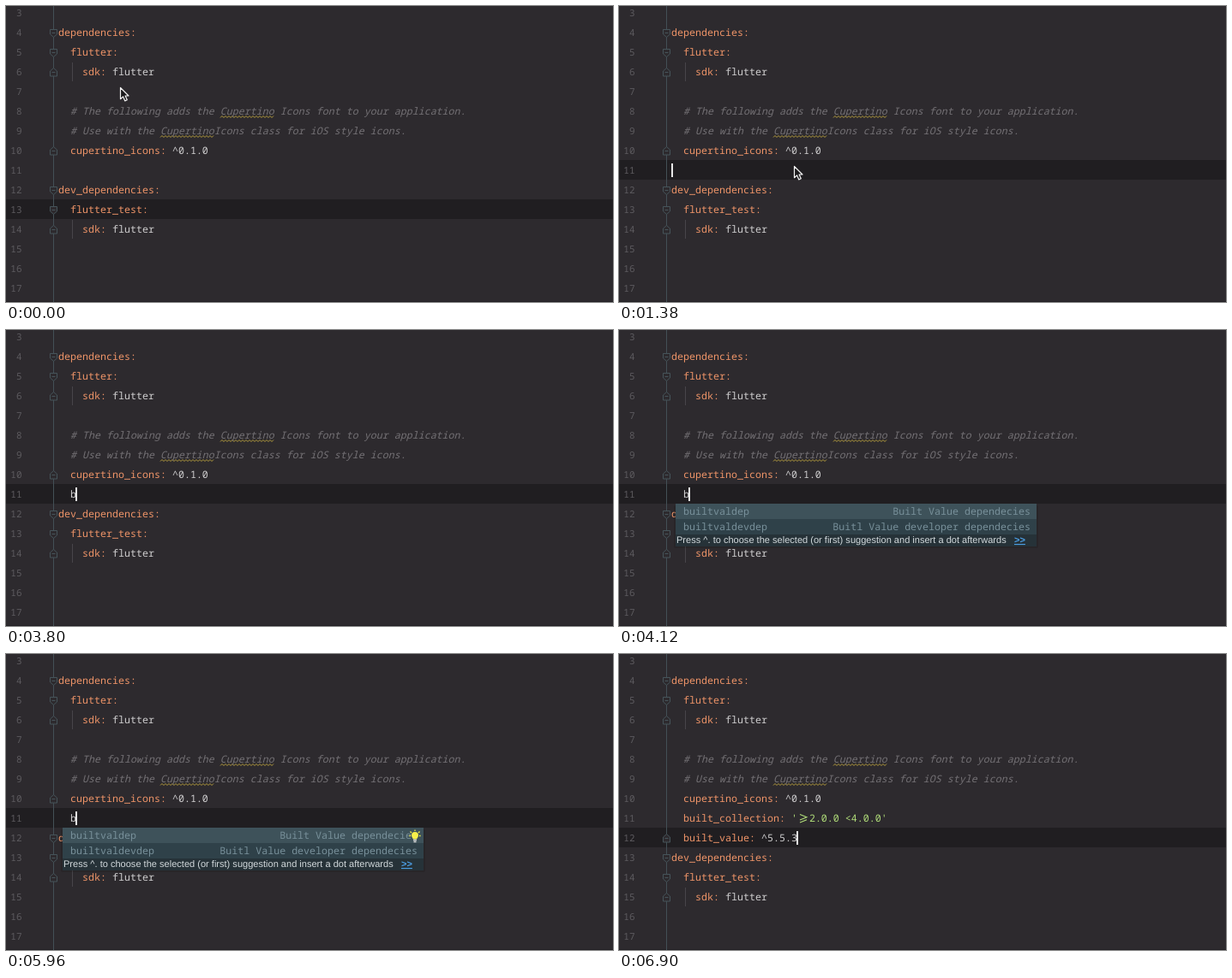
Recreate the animation shown at these times as an HTML page. Size 708 by 346 pixels, loop 6.94 s.

```html
<!DOCTYPE html>
<html lang="en">
<head>
<meta charset="utf-8">
<title>Live template in an editor</title>
<style>
  html, body { margin: 0; width: 100%; height: 100%; overflow: hidden; background: #2d2a2e; }
  svg { display: block; width: 708px; height: 346px; }
  text { font: 11.667px "Noto Sans Mono", "DejaVu Sans Mono", monospace; white-space: pre; text-rendering: geometricPrecision; }
  .num { fill: #5d5b5f; font-size: 11px; text-anchor: end; }
  .key { fill: #ee9468; }
  .val { fill: #cfcecf; }
  .str { fill: #b0dd79; }
  .note { fill: #737074; font-style: italic; }
  .fold { fill: #2d2a2e; stroke: #46545a; }
  .guide { stroke: #48454a; }
  .wave { fill: none; stroke: #b59d3d; }
  .item { fill: #78909a; }
  .right { text-anchor: end; }
  .hint { font: 11.05px "Liberation Sans", Arial, sans-serif; fill: #d3dadd; }
  .link { font-weight: bold; fill: #4c9fe6; text-decoration: underline; }
</style>
</head>
<body>
<svg viewBox="0 0 708 346" xmlns="http://www.w3.org/2000/svg">
  <rect width="708" height="346" fill="#2d2a2e"/>
  <rect id="current" width="708" height="23" fill="#201e21"/>
  <path d="M0 345.5H708" stroke="#232125"/>
  <path d="M55.5 0V346" stroke="#435056"/>
  <g id="code"></g>
  <rect id="caret" width="2" height="16" fill="#e8e8e8"/>
  <g id="popup">
    <rect x="64" y="205" width="425" height="50" rx="2" fill="#000" opacity=".12"/>
    <rect x="66" y="203" width="421" height="50" fill="#263238"/>
    <rect x="66" y="203" width="421" height="18" fill="#3e525a"/>
    <rect x="66" y="221" width="421" height="18" fill="#2f4149"/>
    <text class="item" x="75" y="216">builtvaldep</text>
    <text class="item right" x="480" y="216">Built Value dependecies</text>
    <text class="item" x="75" y="234">builtvaldevdep</text>
    <text class="item right" x="480" y="234">Buitl Value developer dependecies</text>
    <text class="hint" x="67" y="249">Press ^. to choose the selected (or first) suggestion and insert a dot afterwards</text>
    <text class="hint link" x="461" y="249">&gt;&gt;</text>
  </g>
  <g id="bulb">
    <path d="M-6.5 -1H-5M5 -1H6.5M-5.5 -6L-4 -4.5M5.5 -6L4 -4.5M0 -8V-6.5" stroke="#f4ec43" stroke-width="1.3"/>
    <path d="M-2 3C-2 2-4 1-4-1.5A4 4 0 0 1 4-1.5C4 1 2 2 2 3Z" fill="#f7f04a"/>
    <path d="M-2 4H2M-1.5 6H1.5" stroke="#d6d6d6" stroke-width="1.4"/>
  </g>
  <path id="mouse" d="M.5 .5V13.7L3.6 10.9L5.8 15.9L8.3 14.8L6.1 10H10Z" fill="#1b1a1c" stroke="#f4f4f4" stroke-width="1.2" stroke-linejoin="round"/>
</svg>
<script>
const LOOP = 6940, CHAR = 7, LEFT = 61;
const CLICK = 1200, INDENT = 1960, TYPE_B = 3720, POPUP = 3860, ACCEPT = 6240;

const el = id => document.getElementById(id);
const rowY = line => 8 + (line - 3) * 23;
const colX = col => LEFT + col * CHAR;
const escape = s => s.replace(/</g, "&lt;");
const between = (t, a, b) => t >= a && t < b;

// Each row: [line, indent, [class, text]...]
const head = [
  [4, 0, ["key", "dependencies:"]],
  [5, 2, ["key", "flutter:"]],
  [6, 4, ["key", "sdk:"], ["val", " flutter"]],
  [8, 2, ["note", "# The following adds the Cupertino Icons font to your application."]],
  [9, 2, ["note", "# Use with the CupertinoIcons class for iOS style icons."]],
  [10, 2, ["key", "cupertino_icons:"], ["val", " ^0.1.0"]]
];
const tail = first => [
  [first, 0, ["key", "dev_dependencies:"]],
  [first + 1, 2, ["key", "flutter_test:"]],
  [first + 2, 4, ["key", "sdk:"], ["val", " flutter"]]
];
const inserted = [
  [11, 2, ["key", "built_collection:"], ["str", " '  2.0.0 <4.0.0'"]],
  [12, 2, ["key", "built_value:"], ["val", " ^5.5.3"]]
];

function rowSvg([line, indent, ...parts]) {
  const spans = parts.map(([cls, s]) => `<tspan class="${cls}">${escape(s)}</tspan>`).join("");
  return `<text x="${colX(indent)}" y="${rowY(line) + 4}">${spans}</text>`;
}

function foldSvg(line, opens) {
  const shape = opens ? "M-4-4H4V1.5L0 5L-4 1.5Z" : "M-4 4.5H4V-1.5L0-5L-4-1.5Z";
  return `<path class="fold" transform="translate(55.5 ${rowY(line) + .5})" d="${shape}M-2 0H2"/>`;
}

function guideSvg(line) {
  return `<path class="guide" d="M77.5 ${rowY(line) - 11}v22"/>`;
}

function waveSvg(line, col) {
  let d = `M${colX(col)} ${rowY(line) + 7.5}`;
  for (let i = 0; i < 31; i++) d += `l2 ${i % 2 ? 2 : -2}`;
  return `<path class="wave" d="${d}"/>`;
}

function codeSvg(expanded, typed) {
  const first = expanded ? 13 : 12;
  const rows = [...head, ...tail(first)];
  if (expanded) rows.push(...inserted);
  else if (typed) rows.push([11, 2, ["val", "b"]]);
  let out = "";
  for (let n = 3; n <= 17; n++) out += `<text class="num" x="18.5" y="${rowY(n) + 4}">${n}</text>`;
  out += [4, 5, first, first + 1].map(n => foldSvg(n, true)).join("");
  out += [6, expanded ? 12 : 10, first + 2].map(n => foldSvg(n, false)).join("");
  out += guideSvg(6) + guideSvg(first + 2) + waveSvg(8, 27) + waveSvg(9, 17);
  out += rows.map(rowSvg).join("");
  // The ">=" ligature
  if (expanded) out += `<path d="M211 187.5L219 190.7L211 194M211 197L219 193.7" fill="none" stroke="#b0dd79" stroke-width="1.1"/>`;
  return out;
}

const path = [[380, 133, 95], [480, 120, 108], [640, 168, 136], [780, 226, 164],
              [870, 228, 188], [940, 214, 197], [1020, 204, 187]];

function mouseAt(t) {
  const last = path.length - 1;
  if (t <= path[0][0]) return path[0].slice(1);
  if (t >= path[last][0]) return path[last].slice(1);
  const i = path.findIndex(p => p[0] > t) - 1;
  const [a, b, c, d] = [-1, 0, 1, 2].map(k => path[Math.min(last, Math.max(0, i + k))]);
  const u = (t - b[0]) / (c[0] - b[0]);
  return [1, 2].map(k => b[k] + .5 * u * (c[k] - a[k]
    + u * (2 * a[k] - 5 * b[k] + 4 * c[k] - d[k]
    + u * (3 * (b[k] - c[k]) + d[k] - a[k]))));
}

// The caret blinks from the latest keystroke or click.
function caretOn(t) {
  if (t < CLICK) return false;
  if (t >= ACCEPT) return true;
  if (t < INDENT) return t < CLICK + 500;
  if (t < TYPE_B) return t < INDENT + 540 || between(t, 3100, 3600);
  return Math.floor((t - TYPE_B) / 500) % 2 === 0;
}

function show(id, on, x, y) {
  const node = el(id);
  node.style.display = on ? "" : "none";
  if (on && x !== undefined) node.setAttribute("transform", `translate(${x} ${y})`);
}

let drawn = "";
function render(t) {
  const expanded = t >= ACCEPT, typed = t >= TYPE_B;
  const state = `${expanded}${typed}`;
  if (state !== drawn) {
    el("code").innerHTML = codeSvg(expanded, typed);
    drawn = state;
  }
  const line = expanded ? 12 : t < CLICK ? 13 : 11;
  const col = expanded ? 21 : typed ? 3 : t >= INDENT ? 2 : 0;
  show("current", true, 0, rowY(line) - 12);
  show("caret", caretOn(t), colX(col) - (col ? 1 : 0), rowY(line) - 8);
  show("popup", between(t, POPUP, ACCEPT));
  const early = between(t, 3100, TYPE_B);
  show("bulb", early || between(t, 4820, ACCEPT), early ? 75 : 477, early ? 173 : 213.5);
  show("mouse", t < INDENT, ...mouseAt(t));
}

const start = performance.now();
function frame() {
  render((performance.now() - start) % LOOP);
  requestAnimationFrame(frame);
}
frame();
</script>
</body>
</html>
```
